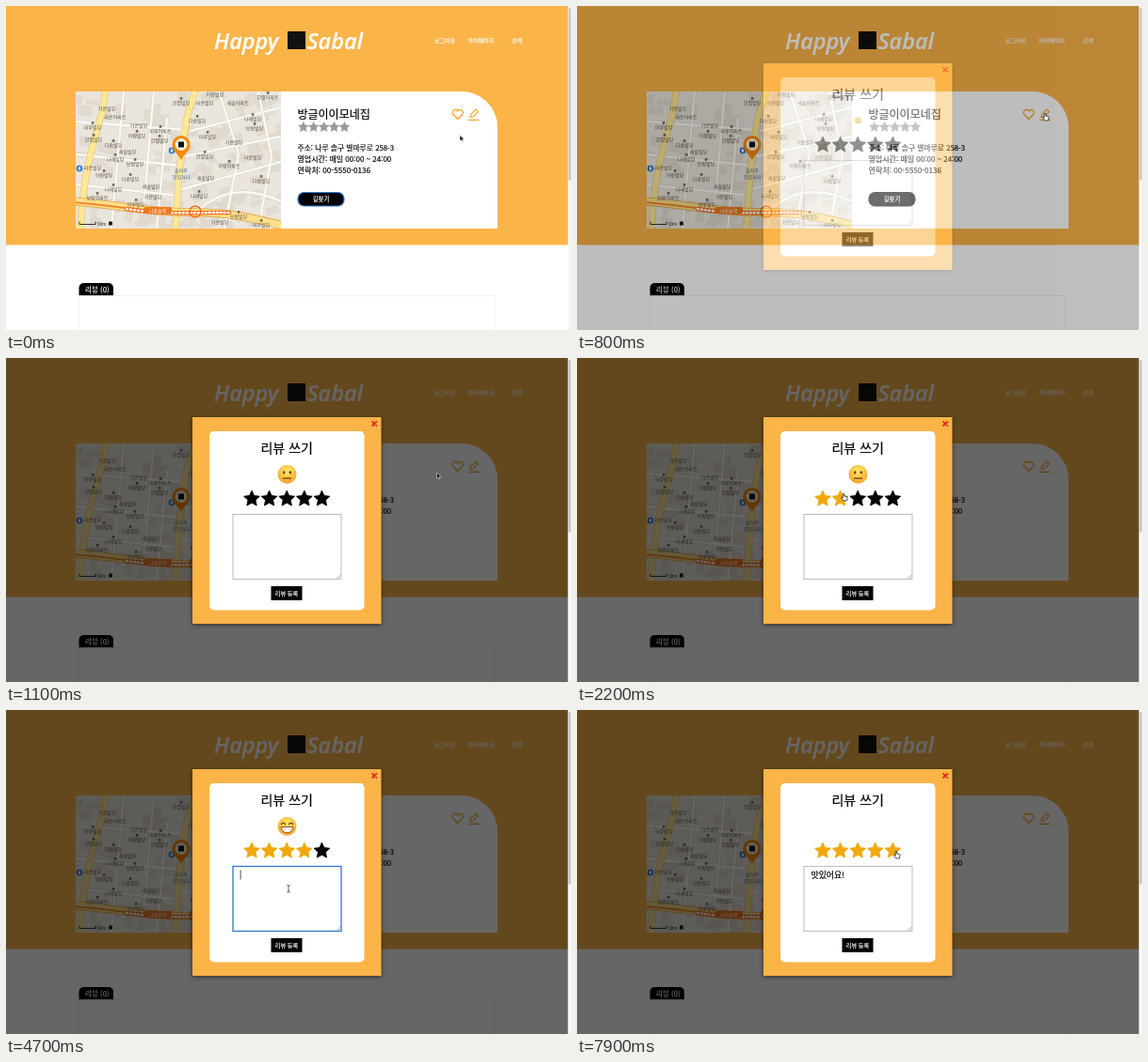
Write an HTML page that moves like this. It is 600 px wide and 345 px high and loops after 8 s.

```html
<!DOCTYPE html>
<html lang="ko">
<head>
<meta charset="utf-8">
<title>리뷰 쓰기</title>
<style>
html, body { margin: 0; width: 100%; height: 100%; overflow: hidden; background: #fff; }
svg { display: block; width: 600px; height: 345px; }
text {
  font-family: 'Noto Sans CJK KR', 'Noto Sans CJK', sans-serif; font-weight: 500;
  fill: currentColor; stroke: currentColor; stroke-width: .18px; white-space: pre;
}
.mid { text-anchor: middle; }
.end { text-anchor: end; }
.brand { font: italic 600 23.5px 'Open Sans', sans-serif; }
.map text { stroke: none; }
.line { fill: none; stroke-linecap: round; stroke-linejoin: round; }
#sheet { filter: drop-shadow(0 1.5px 2.5px #0008); }
</style>
</head>
<body>
<svg id="stage" viewBox="0 0 600 345"></svg>
<script>
const LOOP = 8000, ORANGE = '#fbb448', GOLD = '#f0a80c';
const $ = id => document.getElementById(id);
const clamp = v => Math.max(0, Math.min(1, v));

let seed = 11;
const rnd = () => (seed = seed * 16807 % 2147483647) / 2147483647;

const text = (s, x, y, size, color = '#000', cls = '') =>
  `<text x="${x}" y="${y}" font-size="${size}" color="${color}" class="${cls}">${s}</text>`;
const rect = (x, y, w, h, fill, more = '') =>
  `<rect x="${x}" y="${y}" width="${w}" height="${h}" fill="${fill}" ${more}/>`;
const line = (d, color, width, more = '') =>
  `<path class="line" d="${d}" stroke="${color}" stroke-width="${width}" ${more}/>`;

function star(x, y, r, color, cls = '') {
  const pts = Array.from({ length: 10 }, (_, i) => {
    const a = i * Math.PI / 5, d = i % 2 ? r * .48 : r;
    return (x + d * Math.sin(a)).toFixed(2) + ',' + (y - d * Math.cos(a)).toFixed(2);
  });
  return `<polygon class="${cls}" points="${pts.join(' ')}" fill="${color}"
    style="stroke:currentColor;color:${color};stroke-width:${r * .1};stroke-linejoin:round"/>`;
}
const stars = (x, y, r, step, color, cls) =>
  [0, 1, 2, 3, 4].map(i => star(x + i * step, y, r, color, cls)).join('');

// Map: blocks, streets, main roads, then place labels
const places = [
  [107, 110], [92, 130], [93, 143], [116, 119], [139, 139], [114, 149], [129, 156],
  [116, 164], [137, 169], [141, 128], [164, 134], [163, 144], [92, 173], [104, 181],
  [132, 185], [154, 193], [114, 196], [97, 205], [156, 204], [138, 212], [186, 104],
  [211, 104], [222, 95], [203, 123], [246, 104], [262, 121], [264, 131], [242, 146],
  [214, 140], [211, 161], [262, 162], [237, 171], [271, 187], [212, 184], [205, 203],
  [247, 225], [227, 231], [271, 234], [278, 98]
];
const words = ['가온', '나래', '다솜', '라온', '마루', '보람', '새솔', '아람', '한별'];

function map() {
  let s = rect(74, 91, 218, 146, '#eae6de');
  for (let i = 0; i < 130; i++) {
    const x = 76 + rnd() * 212, y = 92 + rnd() * 142;
    s += rect(x, y, 5 + rnd() * 10, 4 + rnd() * 8, '#e1dbd1',
      `stroke="#d5cfc4" stroke-width=".4" transform="rotate(${x > 190 ? -22 : 8} ${x} ${y})"`);
  }
  const streets = `M74 123L190 132M74 158L186 170M74 190L184 202M125 91L112 237
    M157 91L146 216M171 120L160 237M196 133L292 108M190 160L292 139M187 195L292 166
    M226 91L247 157L232 237M268 91L282 160L268 237M200 222Q236 183 292 208`;
  s += line(streets, '#d8d0c4', 3.4) + line(streets, '#fbfaf6', 2.4);
  const roads = 'M105 88C105 126 83 148 79 240M202 88C189 120 187 150 183 190L180 240';
  s += line(roads, '#e0c27a', 7.4) + line(roads, '#fbe896', 6.2);
  const avenue = 'M72 208C112 211 135 217 175 219S225 216 295 234';
  s += line(avenue, '#dfa84e', 9) + line(avenue, '#fde08a', 7.4);
  s += line('M72 209C112 212 135 218 175 219', '#f0862c', 2);
  s += line('M128 216C165 222 190 220 237 220', '#ef6c1c', 4.5);
  s += line('M128 216C165 222 190 220 237 220', '#fff', 2.5, 'stroke-dasharray="1 3"');
  s += rect(146, 214, 30, 7, '#f0781e', 'rx="2"') + text('나루솔역', 161, 219.6, 5, '#fff', 'mid');
  s += `<circle cx="201" cy="219" r="6" fill="none" stroke="#ef6c1c" stroke-width="1.5"/>`;
  places.forEach(([x, y], i) => {
    s += text(words[i * 4 % 9] + (i % 7 == 3 ? '아파트' : '빌딩'), x, y + 1, 5, '#5d534a', 'mid');
    if (i % 3) s += rect(x - 1.2, y - 7, 2.6, 2.8, '#796d62');
  });
  for (const [x, y] of [[78, 173], [176, 154]])
    s += `<circle cx="${x}" cy="${y}" r="3.4" fill="#3d7fd0"/>` + rect(x - 1, y - 1.5, 2, 3, '#fff');
  s += text('솔마루', 186, 177, 5, '#46709c', 'mid') + text('맛집거리', 186, 183.5, 5, '#46709c', 'mid');
  s += line('M78 230v2.5h17v-2.5', '#222', .9) + text('50m', 97, 233.5, 4.5, '#222') + rect(109, 229.5, 4, 4, '#222');
  s += `<path d="M186 164C183 158 176.500 154 176.500 147.500A9.500 9.500 0 0 1 195.500 147.500C195.500 154 189 158 186 164Z" fill="#f58a0b"/>
    <circle cx="186" cy="147.500" r="6.400" fill="#fff3df"/>` + rect(183, 144.5, 6, 6, '#111');
  return `<g class="map" clip-path="url(#mapBox)">${s}</g>`;
}

const page = () => rect(0, 0, 600, 345, '#fff') + rect(0, 0, 597, 254.5, ORANGE) +
  text('Happy', 221, 46, 23.5, '#fff', 'brand') +
  text('Sabal', 379, 46, 23.5, '#fff', 'brand end') +
  rect(299, 27, 19, 19, '#111') +
  text('로그아웃', 455, 39, 6, '#fff') + text('마이페이지', 490.5, 39, 6, '#fff') + text('검색', 537, 39, 6, '#fff') +
  '<path d="M74 91H484A38 38 0 0 1 522 129V237H74Z" fill="#fff"/>' + map() +
  text('방글이이모네집', 309.5, 119.5, 12) + stars(315.8, 129, 5.6, 10.9, '#999') +
  text('주소: 나루 솔구 별마루로 258-3', 309.5, 154, 7.8) +
  text('영업시간: 매일 00:00 ~ 24:00', 309.5, 166, 8) +
  text('연락처: 00-5550-0136', 309.5, 178, 8.1) +
  rect(310, 198.5, 49, 14.5, '#000', 'id="route" rx="6.5" stroke-width="1.2"') +
  text('길찾기', 334.5, 208, 6.3, '#fff', 'mid') +
  line('M479.700 120.500L475 115.500C472.500 112 477.500 108 479.700 112C482 108 487 112 484.500 115.500Z', '#f5a52c', 1.2) +
  line('M493 118.500l.6-3.200 5.200-5.200 2.600 2.600-5.200 5.200zM491.500 121.300h10.500', '#f5a52c', 1.2) +
  '<path d="M77.500 308.500V300A5 5 0 0 1 82.500 295H109A5 5 0 0 1 114 300V308.500Z"/>' +
  text('리뷰 (0)', 84, 304.5, 7.6, '#fff') +
  line('M77.500 350V308.500H519V350', '#ececec', .8);

const eyes = d => line(d, '#6b3a12', 1.3);
const faces = [
  '<ellipse cx="-3.300" cy="-1.800" rx="1.200" ry="1.700" fill="#6b3a12"/><ellipse cx="3.300" cy="-1.800" rx="1.200" ry="1.700" fill="#6b3a12"/>' +
    eyes('M-4 4.500H4'),
  eyes('M-6-2Q-4-5-2-2M2-2Q4-5 6-2') +
    '<path d="M-6.300 .8H6.300Q5.500 7 0 7T-6.300 .8Z" fill="#fff" stroke="#7a4216" stroke-width=".9"/>' +
    line('M-5.500 3.500H5.500M-2.500 1V6.300M2.500 1V6.300', '#c9b9a4', .4)
];

const modal = () => '<path d="M0-9H597V354H0ZM198 63V283H398V63Z" fill-opacity=".6"/>' +
  rect(198, 63, 200.5, 220, ORANGE, 'id="sheet"') +
  rect(216, 78, 164.5, 190.5, '#fff', 'rx="5"') +
  line('M389 67.800l4.400 4.400m0-4.400l-4.400 4.400', '#e02418', 1.7) +
  text('리뷰 쓰기', 298.2, 101.3, 14, '#000', 'mid') +
  `<g id="emoji"><circle r="10" fill="url(#skin)"/>${faces.map(f => `<g class="face">${f}</g>`).join('')}</g>` +
  stars(261, 150, 8.8, 18.6, '#000', 'rate') +
  rect(241, 166.5, 115, 69, '#fff', 'id="box"') +
  line('M351.500 234.500l3.500-3.500M353.500 234.500l1.500-1.500', '#888', .6) +
  text('', 248.5, 178.5, 8.9).replace('<text', '<text id="typed"') +
  rect(0, 180.2, 8, .7, '#000', 'id="under"') + rect(0, 170.5, .7, 10, '#000', 'id="caret"') +
  rect(281.5, 243, 33, 15, '#000') + text('리뷰 등록', 298, 252.8, 6.2, '#fff', 'mid');

const pointers = {
  arrow: '<path d="M0 0V6.200L1.500 4.900 2.500 7 3.400 6.600 2.500 4.600H4.400Z" fill="#000" stroke="#fff" stroke-width=".5"/>',
  hand: '<path d="M-.8 .6Q0-.5 .8 .6V3L3.600 3.600Q4.200 4 4 5.200L3.300 8H-.2L-2.300 5.200Q-2.400 4-.8 4.800Z" fill="#fff" stroke="#000" stroke-width=".7"/>',
  beam: line('M-1.300-3.500Q0-3.500 0-2.500V3Q0 4-1.300 4M1.300-3.500Q0-3.500 0-2.500M0 3Q0 4 1.300 4', '#222', .7)
};

$('stage').innerHTML = `<defs>
  <clipPath id="mapBox"><rect x="74" y="91" width="218" height="146"/></clipPath>
  <radialGradient id="skin" cy=".35" r=".7"><stop offset=".2" stop-color="#ffdf5c"/><stop offset="1" stop-color="#f39a23"/></radialGradient>
  </defs>${page()}<g id="modal">${modal()}</g>` +
  Object.keys(pointers).map(k => `<g class="pointer" id="${k}">${pointers[k]}</g>`).join('') +
  rect(596.7, 0, 4, 345, '#f7f7f7') + rect(597.6, 2, 2, 184, '#bdbdbd', 'rx="1"');

const path = [
  [0, 482, 137.5], [100, 482, 137.5], [600, 497, 114], [1000, 497, 114], [1600, 262, 162],
  [1850, 259, 148], [2200, 283, 144], [2700, 331, 150], [3000, 331, 151], [3200, 336, 152],
  [3400, 330, 154], [3900, 330, 154], [4400, 300, 190], [6500, 300, 190], [7300, 318, 165],
  [7600, 339, 150], [8000, 339, 150]
];
const shapes = [[0, 'arrow'], [500, 'hand'], [1050, 'arrow'], [1850, 'hand'], [4050, 'beam'],
  [5100, ''], [6500, 'beam'], [7250, 'arrow'], [7420, 'hand']];
const ratings = [[0, 0], [1900, 1], [2100, 2], [2400, 3], [2700, 4], [3100, 5], [3300, 4], [7500, 5]];
const typing = [[0, ''], [5100, 'ㅁ'], [5200, '마'], [5300, '맛'], [5500, '맛ㅇ'], [5600, '맛이'],
  [5700, '맛있'], [5800, '맛있어'], [5900, '맛있어ㅇ'], [6000, '맛있어요'], [6200, '맛있어요!']];

const at = (steps, t) => steps.filter(s => s[0] <= t).pop()[1];
const show = (el, on) => el.style.display = on ? '' : 'none';

function along(t) {
  const i = path.findIndex(p => p[0] > t), [t0, x0, y0] = path[i - 1], [t1, x1, y1] = path[i];
  const k = (t - t0) / (t1 - t0);
  return [x0 + (x1 - x0) * k, y0 + (y1 - y0) * k];
}

const rates = document.querySelectorAll('.rate'), moods = document.querySelectorAll('.face');

function draw(t) {
  const open = clamp((t - 660) / 330);
  $('modal').setAttribute('opacity', open);
  $('modal').setAttribute('transform', `translate(0 ${-3.5 * (1 - open)})`);
  $('route').setAttribute('stroke', t < 600 ? '#2f7fe0' : '#000');

  const born = t < 3380 ? 650 : t < 7900 ? 3380 : 7900;
  $('emoji').setAttribute('transform', `translate(298.500 123.700) scale(${clamp((t - born) / 400)})`);
  moods.forEach((m, i) => show(m, i == (t >= 3380)));

  const rating = at(ratings, t);
  rates.forEach((s, i) => {
    const c = i < rating ? GOLD : '#000';
    s.setAttribute('fill', c);
    s.style.color = c;
  });

  const focus = t >= 4500 && t < 7800, composing = t >= 5100 && t < 6200;
  $('box').setAttribute('stroke', focus ? '#2f74d0' : '#b5b5b5');
  $('box').setAttribute('stroke-width', focus ? 1.3 : .9);
  const typed = $('typed');
  typed.textContent = at(typing, t);
  const end = 248.5 + (typed.textContent ? typed.getComputedTextLength() : 0);
  const busy = t >= 5100 && t < 6300;
  $('caret').setAttribute('x', end + .2);
  show($('caret'), focus && (busy || Math.floor((t - 4500) / 500) % 2 == 0));
  $('under').setAttribute('x', end - 8);
  show($('under'), composing);

  const shape = at(shapes, t);
  document.querySelectorAll('.pointer').forEach(p => {
    show(p, p.id == shape);
    p.setAttribute('transform', `translate(${along(t)})`);
  });
}

const start = performance.now();
function tick() {
  draw((performance.now() - start) % LOOP);
  requestAnimationFrame(tick);
}
tick();
</script>
</body>
</html>
```
